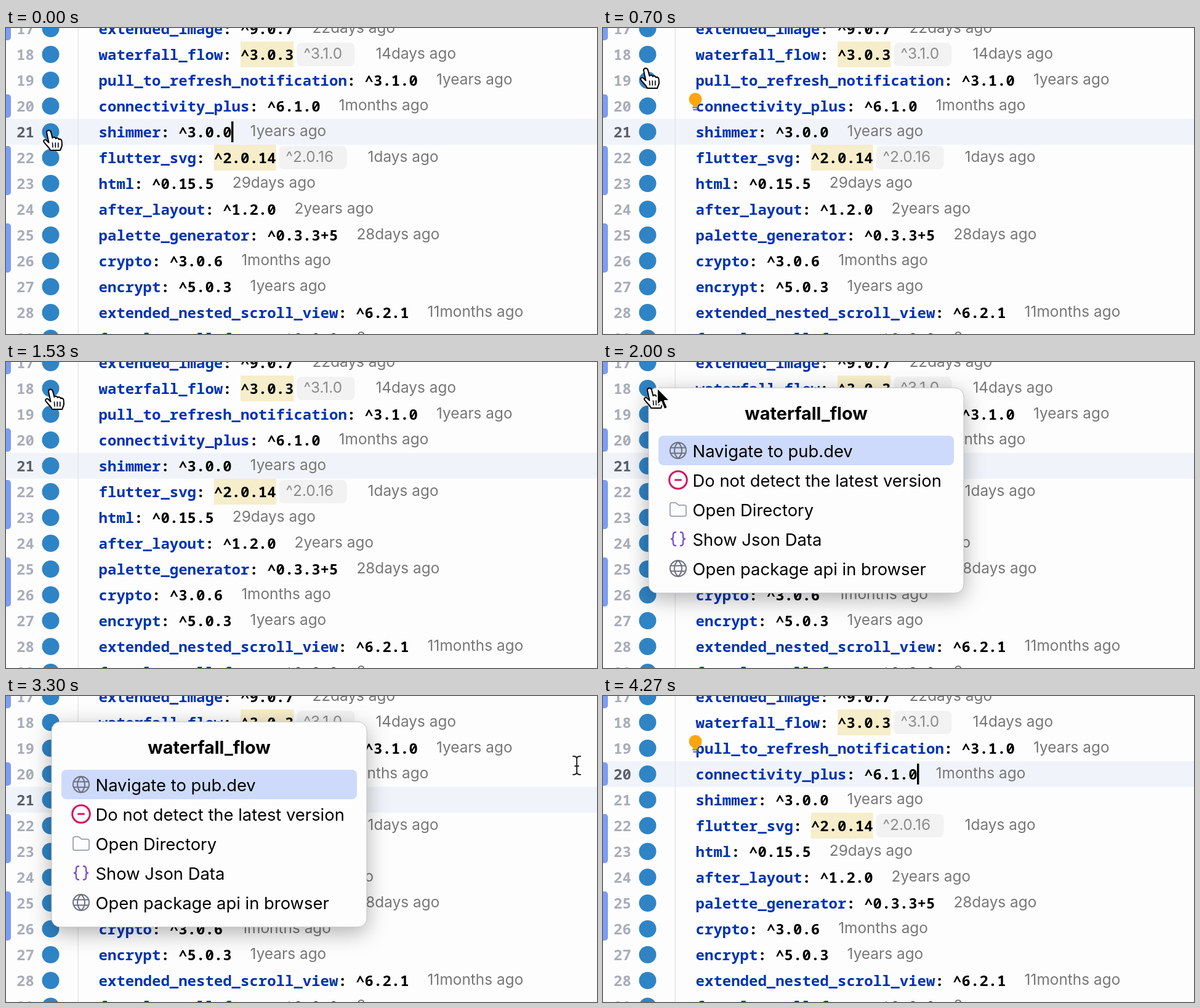
An HTML page that plays this animation: 960 px wide and 498 px high, repeating every 4310 ms.

```html
<!DOCTYPE html>
<html lang="en">
<head>
<meta charset="utf-8">
<title>Dependency list</title>
<style>
  html, body { margin: 0; width: 100%; height: 100%; overflow: hidden; background: #fdfdfd; }
  svg { display: block; width: 100%; height: 100%; }
  text { white-space: pre; font-optical-sizing: none; }
  .code, .num { font: 800 24px "Noto Sans Mono", "DejaVu Sans Mono", monospace; font-variant-ligatures: none; }
  .num { font-weight: 700; fill: #a9adbb; }
  .num.on { fill: #5c606c; }
  .key { fill: #0033b3; }
  .age, .next { font: 400 24.4px Inter, "Liberation Sans", sans-serif; fill: #777; }
  .next { fill: #8b8b8b; }
  .item { font: 400 27.4px Inter, "Liberation Sans", sans-serif; }
  .title { font: 700 28.8px Inter, "Liberation Sans", sans-serif; text-anchor: middle; }
  .line { fill: none; stroke-linecap: round; stroke-linejoin: round; }
  #panel { filter: drop-shadow(0 9px 17px rgba(0, 0, 0, .3)); }
</style>
</head>
<body>
<svg id="stage" viewBox="0 0 960 498" preserveAspectRatio="none"></svg>
<script>
const LOOP = 4310, ROW = 42, CHAR = 14.4, LEFT = 150.6, FIRST = 17;

// name, version, age, newer version
const deps = [
  ['extended_image', '^9.0.7', '22days'],
  ['waterfall_flow', '^3.0.3', '14days', '^3.1.0'],
  ['pull_to_refresh_notification', '^3.1.0', '1years'],
  ['connectivity_plus', '^6.1.0', '1months'],
  ['shimmer', '^3.0.0', '1years'],
  ['flutter_svg', '^2.0.14', '1days', '^2.0.16'],
  ['html', '^0.15.5', '29days'],
  ['after_layout', '^1.2.0', '2years'],
  ['palette_generator', '^0.3.3+5', '28days'],
  ['crypto', '^3.0.6', '1months'],
  ['encrypt', '^5.0.3', '1years'],
  ['extended_nested_scroll_view', '^6.2.1', '11months'],
  ['fontal_scroll_fects', '^0.0.0', '2years']
];

function add(parent, tag, attrs, content) {
  const el = document.createElementNS('http://www.w3.org/2000/svg', tag);
  for (const k in attrs) el.setAttribute(k, attrs[k]);
  if (content) el.textContent = content;
  return parent.appendChild(el);
}
const stage = document.getElementById('stage');
const group = (parent = stage, attrs = {}) => add(parent, 'g', attrs);
const rect = (p, x, y, width, height, fill, rx = 0) => add(p, 'rect', { x, y, width, height, fill, rx });
const label = (p, cls, x, y, text) => add(p, 'text', { class: cls, x, y }, text);
const stroke = (p, d, color, width) =>
  add(p, 'path', { d, class: 'line', stroke: color, 'stroke-width': width });
const rowTop = n => 148 + (n - 21) * ROW;
const show = (el, on) => el.setAttribute('visibility', on ? 'visible' : 'hidden');
const place = (el, x, y) => el.setAttribute('transform', `translate(${x} ${y})`);

// editor
rect(stage, 0, 0, 960, 498, '#fdfdfd');
const band = rect(stage, 0, 0, 960, ROW, '#f0f4fa');
rect(stage, 116.5, 0, 1.5, 498, '#e4e5ea');
for (const [from, to] of [[16, 17], [20, 20], [22, 23], [25, 26]])
  rect(stage, -8, rowTop(from) + 2, 16, (to - from + 1) * ROW - 4, '#7b9df4', 5);

const nums = deps.map(([name, version, age, next], i) => {
  const n = FIRST + i, top = rowTop(n);
  const start = LEFT + (name.length + 2) * CHAR;
  let end = start + version.length * CHAR;
  if (next) rect(stage, start, top, end - start, ROW, '#f6edca');
  const line = label(stage, 'code', LEFT, top + 30);
  add(line, 'tspan', { class: 'key' }, name);
  add(line, 'tspan', {}, ': ' + version);
  if (next) {
    const wide = next.length > 6 ? 110 : 94;
    rect(stage, end + 5, top + 2, wide, 38, '#f2f2f2', 8);
    label(stage, 'next', end + 16, top + 28, next);
    end += wide + 9;
  }
  label(stage, 'age', end + 30, top + 28, age + ' ago');
  add(stage, 'circle', { cx: 72.5, cy: top + 21, r: 14, fill: '#2f84c6' });
  return label(stage, 'num', 17, top + 30, String(n));
});

const caret = rect(stage, 0, 0, 3.4, 34, '#000');
const bulb = group();
add(bulb, 'circle', { cx: 150, cy: 0, r: 10.5, fill: '#fca510' });
rect(bulb, 146, 5, 8, 7, '#fca510');
stroke(bulb, 'M146 13.5h8M147 17h6', '#6c707e', 2);

// popup menu
const menu = group();
const panel = rect(menu, 74, 42, 512, 334, '#fdfdfd', 14);
panel.id = 'panel';
panel.setAttribute('stroke', '#c2c3c8');
label(menu, 'title', 330, 94, 'waterfall_flow');
rect(menu, 90, 120, 480, 48, '#cddafb', 8);
['Navigate to pub.dev', 'Do not detect the latest version', 'Open Directory',
  'Show Json Data', 'Open package api in browser'
].forEach((text, i) => label(menu, 'item', 145.5, 155 + i * 48, text));

const icon = y => group(menu, { transform: `translate(122 ${y})` });
function globe(y) {
  stroke(icon(y), 'M-13 0a13 13 0 1 0 26 0a13 13 0 1 0-26 0M-12-4.5H12M-12 4.5H12' +
    'M0-13C-8-6-8 6 0 13C8 6 8-6 0-13', '#6c707e', 2);
}
globe(144);
globe(336);
stroke(icon(192), 'M-14.3 0a14.3 14.3 0 1 0 28.6 0a14.3 14.3 0 1 0-28.6 0M-4.5 0H4.5', '#d5145f', 3);
stroke(icon(240), 'M-13-8q0-3 3-3h6l5 4h9q3 0 3 3v12q0 3-3 3h-20q-3 0-3-3z', '#a5a9b8', 2);
stroke(icon(288), 'M-4-11q-4 0-4 4v3q0 4-3 4q3 0 3 4v3q0 4 4 4' +
  'M4-11q4 0 4 4v3q0 4 3 4q-3 0-3 4v3q0 4-4 4', '#7a4fdc', 2.4);

// pointers
const hand = group();
add(hand, 'path', {
  d: 'M-4 3C-4-1.5 2-1.5 3 2.5L5.5 12C7 10 10 10.5 10.8 13C12.5 11.3 15.5 12 16 14.5' +
    'C18 13 20.5 14.5 20.6 17.5L21 23C21 27 18.5 29 18.3 32H2C1 28-5 23.5-8.5 18.5' +
    'C-10 15-6 13.5-3.5 16.5L-.5 19.5Z',
  fill: '#fff', stroke: '#000', 'stroke-width': 2, 'stroke-linejoin': 'round'
});
stroke(hand, 'M5.5 20l.6 7M10.3 20v7M14.8 20v7', '#000', 1.6);

const arrow = group();
add(arrow, 'path', {
  d: 'M0 0V28L6.5 22.5L11.5 35L17 32.5L12 21H20.5Z',
  fill: '#000', stroke: '#fff', 'stroke-width': 2, 'stroke-linejoin': 'round'
});

const beam = group();
const ring = add(beam, 'circle', { r: 32.5, fill: '#fdfdfd', stroke: '#000', 'stroke-width': 2.8 });
const beamPath = 'M-6-15q6 0 6 4q0-4 6-4M0-11V11M-6 15q6 0 6-4q0 4 6 4M-3 1H3';
stroke(beam, beamPath, '#fff', 4);
stroke(beam, beamPath, '#222', 2);

// keys: [time, x, y], eased between neighbours
function along(keys, t) {
  let a = keys[0];
  for (const b of keys) {
    if (t < b[0]) {
      const u = Math.max(0, (t - a[0]) / (b[0] - a[0] || 1)), e = u * u * (3 - 2 * u);
      return [a[1] + (b[1] - a[1]) * e, a[2] + (b[2] - a[2]) * e];
    }
    a = b;
  }
  return [a[1], a[2]];
}
const handPath = [[80, 70, 167], [600, 70, 66], [800, 70, 66], [1150, 73, 45], [1800, 73, 45], [1950, 76, 43]];
const arrowPath = [[2100, 88, 42], [2600, 975, 90]];
const beamMove = [[3230, 975, 110], [3450, 780, 122], [3800, 780, 122], [4050, 790, -40]];
const within = (t, from, to) => t >= from && t < to;

function draw(t) {
  const active = t < 3670 ? 21 : 20, top = rowTop(active);
  band.setAttribute('y', top);
  nums.forEach((el, i) => el.classList.toggle('on', FIRST + i === active));

  const [name, version] = deps[active - FIRST];
  caret.setAttribute('x', LEFT + (name.length + 2 + version.length) * CHAR - .6);
  caret.setAttribute('y', top + 4);
  const blink = active === 21 ? t % 1000 : t - 3670;
  show(caret, blink < 500 || t > 4170 || within(t, 3400, 3670));

  place(bulb, 0, top - 32);
  show(bulb, within(t, 400, 1070) || t >= 4000);
  show(menu, within(t, 1650, 3400));

  place(hand, ...along(handPath, t));
  show(hand, t < 2100);
  place(arrow, ...along(arrowPath, t));
  show(arrow, within(t, 1930, 2600));
  place(beam, ...along(beamMove, t));
  show(beam, within(t, 3230, 4050));
  show(ring, within(t, 3400, 3640));
}

const begin = performance.now();
function tick() {
  draw((performance.now() - begin) % LOOP);
  requestAnimationFrame(tick);
}
draw(0);
requestAnimationFrame(tick);
</script>
</body>
</html>
```
